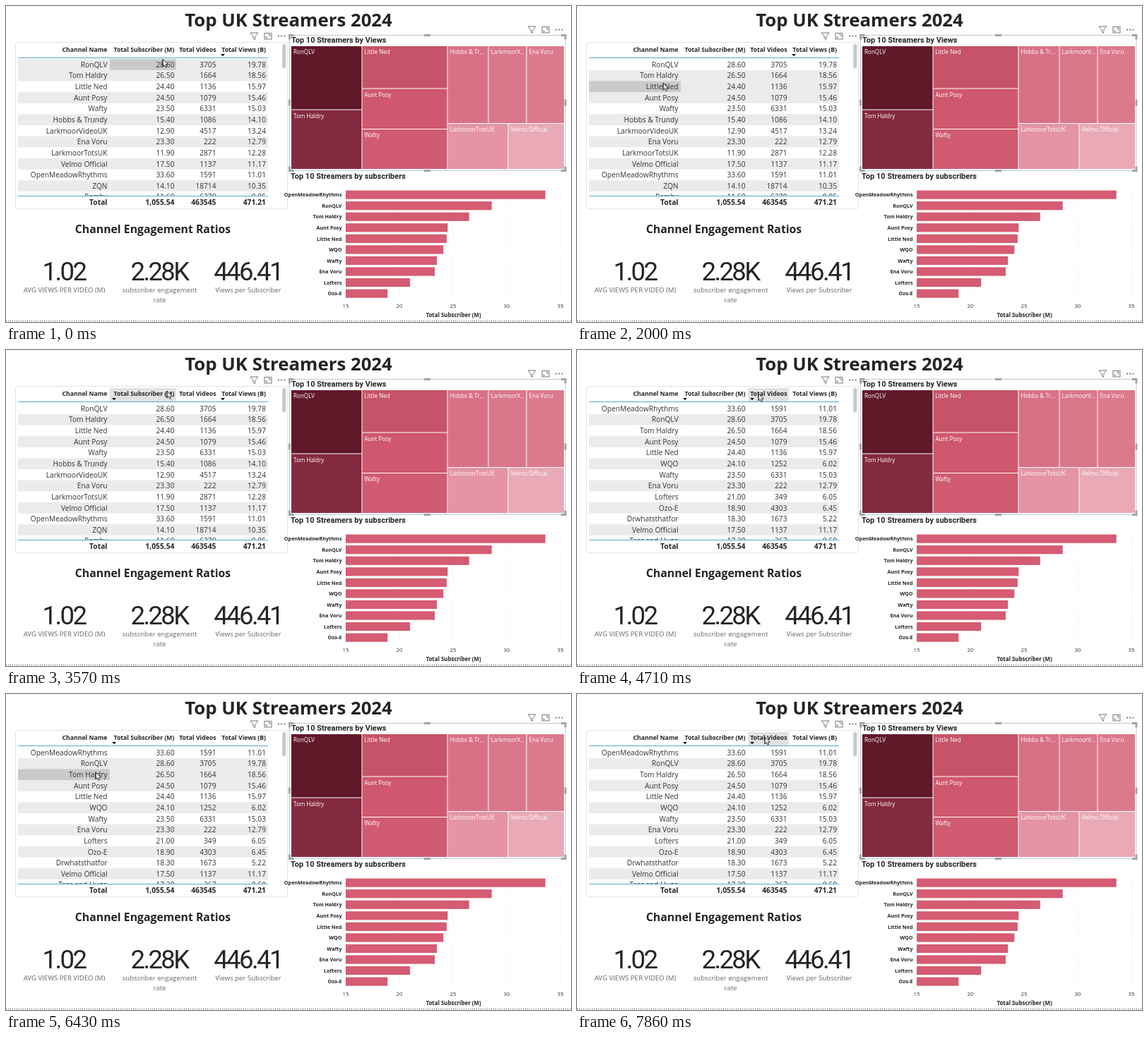
Write an HTML page with a canvas that moves like this. It is 800 px wide and 448 px high and loops after 8000 ms.

```html
<!DOCTYPE html>
<html lang="en">
<head>
<meta charset="utf-8">
<title>Top UK Streamers 2024</title>
<style>
html, body { margin: 0; width: 100%; height: 100%; overflow: hidden; background: #fff; }
canvas { display: block; width: 800px; height: 448px; }
</style>
</head>
<body>
<canvas id="stage" width="800" height="448"></canvas>
<script>
const ctx = document.getElementById('stage').getContext('2d');
const LOOP = 8000, FPS = 7, SORT_STEP = 28;
const SANS = '"Open Sans", "Noto Sans", sans-serif';
const DIN = 'Roboto, sans-serif';
const INK = '#252423', ROSE = '#d55c72', BLUE = '#5aa9cc';

// name, subscribers (M), videos, views (B)
const channels = [
  ['RonQLV', 28.6, 3705, 19.78],
  ['Tom Haldry', 26.5, 1664, 18.56],
  ['Little Ned', 24.4, 1136, 15.97],
  ['Aunt Posy', 24.5, 1079, 15.46],
  ['Wafty', 23.5, 6331, 15.03],
  ['Hobbs & Trundy', 15.4, 1086, 14.1],
  ['LarkmoorVideoUK', 12.9, 4517, 13.24],
  ['Ena Voru', 23.3, 222, 12.79],
  ['LarkmoorTotsUK', 11.9, 2871, 12.28],
  ['Velmo Official', 17.5, 1137, 11.17],
  ['OpenMeadowRhythms', 33.6, 1591, 11.01],
  ['ZQN', 14.1, 18714, 10.35],
  ['Pemby', 11.6, 6270, 9.05],
  ['WQO', 24.1, 1252, 6.02],
  ['Lofters', 21, 349, 6.05],
  ['Ozo-E', 18.9, 4303, 6.45],
  ['Drwhatsthatfor', 18.3, 1673, 5.22],
  ['Tess and Hugo', 17.2, 367, 8.6]
];
const ranked = col => [...channels].sort((a, b) => b[col] - a[col]).slice(0, 13);
const bySubs = ranked(1), byViews = ranked(3);

const columns = [
  { title: 'Channel Name', x: 17, end: 147, right: 143.5, total: 'Total' },
  { title: 'Total Subscriber (M)', x: 147, end: 241, right: 238.5, total: '1,055.54' },
  { title: 'Total Videos', x: 242, end: 300, right: 297.5, total: '463545' },
  { title: 'Total Views (B)', x: 301, end: 371, right: 368, total: '471.21' }
];
const ROW_TOP = 75.2, ROW_H = 15.64, BODY_END = 269;

// x, y, width, height, colour, in order of views
const tiles = [
  [404, 57, 99.5, 89.5, '#611829'],
  [404, 147.5, 99.5, 83.5, '#842a3e'],
  [504.5, 57, 120, 59.5, '#c65368'],
  [504.5, 117.5, 120, 56.5, '#cf586e'],
  [504.5, 175, 120, 56, '#d05b71'],
  [625.5, 57, 57, 109, '#d97186'],
  [683.5, 57, 53, 109, '#da768a'],
  [737.5, 57, 52.5, 109, '#db7a8d'],
  [625.5, 167, 85, 64, '#e494a5'],
  [711.5, 167, 78.5, 64, '#e9a9b6']
];
const shortened = { 5: 'Hobbs & Tr...', 6: 'LarkmoorV...' };

// Pointer path: step, x, y
const path = [
  [0, 222, 75.5], [6, 124, 75.5], [14, 122, 109], [18, 123, 110],
  [25, 228, 58], [29, 229, 59], [33, 257, 62], [36, 259, 62],
  [42, 128, 109], [45, 127, 111], [49, 128, 110], [55, 266, 61]
];

function box(x, y, w, h, color) {
  ctx.fillStyle = color;
  ctx.fillRect(x, y, w, h);
}

function text(str, x, y, font, color = INK, align = 'left', spacing = 0) {
  ctx.font = font;
  ctx.fillStyle = color;
  ctx.textAlign = align;
  ctx.letterSpacing = spacing + 'px';
  ctx.fillText(str, x, y);
}

function line(points, color, width = 1, dash = []) {
  ctx.strokeStyle = color;
  ctx.lineWidth = width;
  ctx.setLineDash(dash);
  ctx.beginPath();
  points.forEach(([x, y]) => ctx.lineTo(x, y));
  ctx.stroke();
  ctx.setLineDash([]);
}

function shape(points, fill) {
  ctx.fillStyle = fill;
  ctx.beginPath();
  points.forEach(([x, y]) => ctx.lineTo(x, y));
  ctx.closePath();
  ctx.fill();
}

function pointerAt(step) {
  let i = 0;
  while (i < path.length - 2 && step >= path[i + 1][0]) i++;
  const [s0, x0, y0] = path[i], [s1, x1, y1] = path[i + 1];
  const u = Math.min(1, (step - s0) / (s1 - s0));
  const e = u * u * (3 - 2 * u);
  return { x: x0 + (x1 - x0) * e, y: y0 + (y1 - y0) * e };
}

function drawPointer({ x, y }) {
  const arrow = [[0, 0], [0, 10], [2.4, 7.9], [4, 11.4], [5.7, 10.6], [4.2, 7.3], [7.3, 7.1]]
    .map(([dx, dy]) => [x + dx, y + dy]);
  shape(arrow, '#fff');
  line([...arrow, arrow[0], arrow[1]], '#222', 0.9);
}

function drawTools(x, y) {
  const gray = '#777';
  line([[x - 5.5, y - 4.5], [x + 5.5, y - 4.5], [x + 1.3, y + 0.5], [x + 1.3, y + 5],
    [x - 1.3, y + 3.5], [x - 1.3, y + 0.5], [x - 5.5, y - 4.5]], gray);
  ctx.strokeRect(x + 14.5, y - 4, 10, 8.5);
  line([[x + 19.5, y - 1.8], [x + 22.5, y - 1.8], [x + 22.5, y + 1]], gray);
  line([[x + 16.5, y + 0.5], [x + 16.5, y + 2.5], [x + 18.8, y + 2.5]], gray);
  for (let i = 0; i < 3; i++) box(x + 33.5 + i * 4.3, y - 0.8, 1.8, 1.8, '#666');
}

function drawTable(step, pointer) {
  const sorted = step >= SORT_STEP ? 1 : 3;
  const rows = sorted === 1 ? bySubs : byViews;
  const hoverCol = columns.findIndex(c => pointer.x >= c.x && pointer.x < c.end);
  const onHeader = pointer.y >= 54 && pointer.y < 73;
  const hoverRow = Math.floor((pointer.y - ROW_TOP) / ROW_H);

  ctx.strokeStyle = '#e3e3e3';
  ctx.lineWidth = 1;
  ctx.beginPath();
  ctx.roundRect(13.5, 51.5, 385, 236, 3);
  ctx.stroke();
  drawTools(351.5, 42.5);
  ctx.fillStyle = '#c8c8c8';
  ctx.beginPath();
  ctx.roundRect(391.3, 54, 5, 34.5, 2.5);
  ctx.fill();

  columns.forEach((c, i) => {
    const hovered = onHeader && i === hoverCol;
    if (hovered) box(c.x, 54, c.end - c.x, 19, '#e2e2e2');
    text(c.title, c.right, 65, `bold 8.7px ${SANS}`, INK, 'right');
    if (i === sorted || hovered && i > 0) {
      const x = c.x + 6;
      shape([[x - 3, 68], [x + 3, 68], [x, 71.3]], '#111');
    }
  });
  box(17, 73, 354, 1, BLUE);

  ctx.save();
  ctx.beginPath();
  ctx.rect(17, 74, 354, BODY_END - 74);
  ctx.clip();
  rows.forEach((row, r) => {
    const top = ROW_TOP + r * ROW_H;
    if (r % 2 || r === hoverRow) box(17, top, 354, ROW_H, '#ebebeb');
    if (r === hoverRow && hoverCol >= 0) {
      const c = columns[hoverCol];
      box(c.x, top, c.end - c.x, ROW_H, '#cacaca');
    }
    row.forEach((value, i) => {
      const label = i % 2 ? value.toFixed(2) : String(value);
      text(label, columns[i].right, top + 11.6, `10.2px ${SANS}`, '#333', 'right');
    });
  });
  ctx.restore();

  box(17, BODY_END, 354, 1, BLUE);
  columns.forEach(c => text(c.total, c.right, 282, `bold 10.3px ${SANS}`, INK, 'right'));
}

function drawTreemap() {
  drawTools(744.5, 33.5);
  const [l, t, r, b] = [401.5, 41.5, 792, 233.5];
  const mx = 596.5, my = 137, edge = '#a3a3a3';
  line([[l, t], [r, t], [r, b], [l, b], [l, t]], '#c6c6c6');
  for (const [x, dx] of [[l, 6], [r, -6]]) {
    for (const [y, dy] of [[t, 6], [b, -6]]) line([[x + dx, y], [x, y], [x, y + dy]], edge, 3);
    line([[x, my - 4.5], [x, my + 4.5]], edge, 3);
  }
  for (const y of [t, b]) line([[mx - 4.5, y], [mx + 4.5, y]], edge, 3);

  text('Top 10 Streamers by Views', 404, 51.5, `bold 11px ${DIN}`);
  tiles.forEach(([x, y, w, h, color], i) => {
    box(x, y, w, h, color);
    text(shortened[i] || byViews[i][0], x + 3, y + 11, `8.1px ${SANS}`, '#fff');
  });
}

function drawBars() {
  const left = 481, unit = 15.2;
  text('Top 10 Streamers by subscribers', 403, 245, `bold 11px ${DIN}`);
  for (let v = 15; v <= 35; v += 5) {
    const x = left + (v - 15) * unit;
    if (v > 15) line([[x, 258], [x, 416]], '#dedede', 1, [1, 3]);
    text(v, x, 428, `7.8px ${SANS}`, '#333', 'center');
  }
  bySubs.slice(0, 10).forEach(([name, subs], i) => {
    const y = 267.5 + i * 15.56;
    box(left, y - 6, (subs - 15) * unit, 12.2, ROSE);
    text(name, 475.5, y + 2.8, `bold 7.2px ${SANS}`, INK, 'right');
  });
  text('Total Subscriber (M)', 633.5, 441, `bold 7.9px ${SANS}`, INK, 'center');
}

function drawRatios() {
  text('Channel Engagement Ratios', 208, 321.5, `bold 15.8px ${SANS}`, INK, 'center');
  const cards = [
    [83, '1.02', ['AVG VIEWS PER VIDEO (M)'], 23],
    [218, '2.28K', ['subscriber engagement', 'rate'], 165],
    [343.5, '446.41', ['Views per Subscriber'], 299]
  ];
  for (const [x, value, lines] of cards) {
    text(value, x - 1, 388.7, `36.5px ${DIN}`, INK, 'center', -2.6);
    lines.forEach((s, i) => {
      text(s, x - 0.5, 406 + i * 13.5, `9.6px ${SANS}`, '#666', 'center');
    });
  }
}

function draw(now) {
  const step = Math.floor((now % LOOP + 5) * FPS / 1000) % (LOOP * FPS / 1000);
  const pointer = pointerAt(step);
  box(0, 0, 800, 448, '#fff');
  text('Top UK Streamers 2024', 400, 28.5, `bold 25.8px ${SANS}`, INK, 'center');
  drawTable(step, pointer);
  drawTreemap();
  drawBars();
  drawRatios();
  line([[0, 446.5], [800, 446.5]], '#444', 1, [1, 2]);
  drawPointer(pointer);
  requestAnimationFrame(() => draw(performance.now()));
}
draw(performance.now());
</script>
</body>
</html>
```
